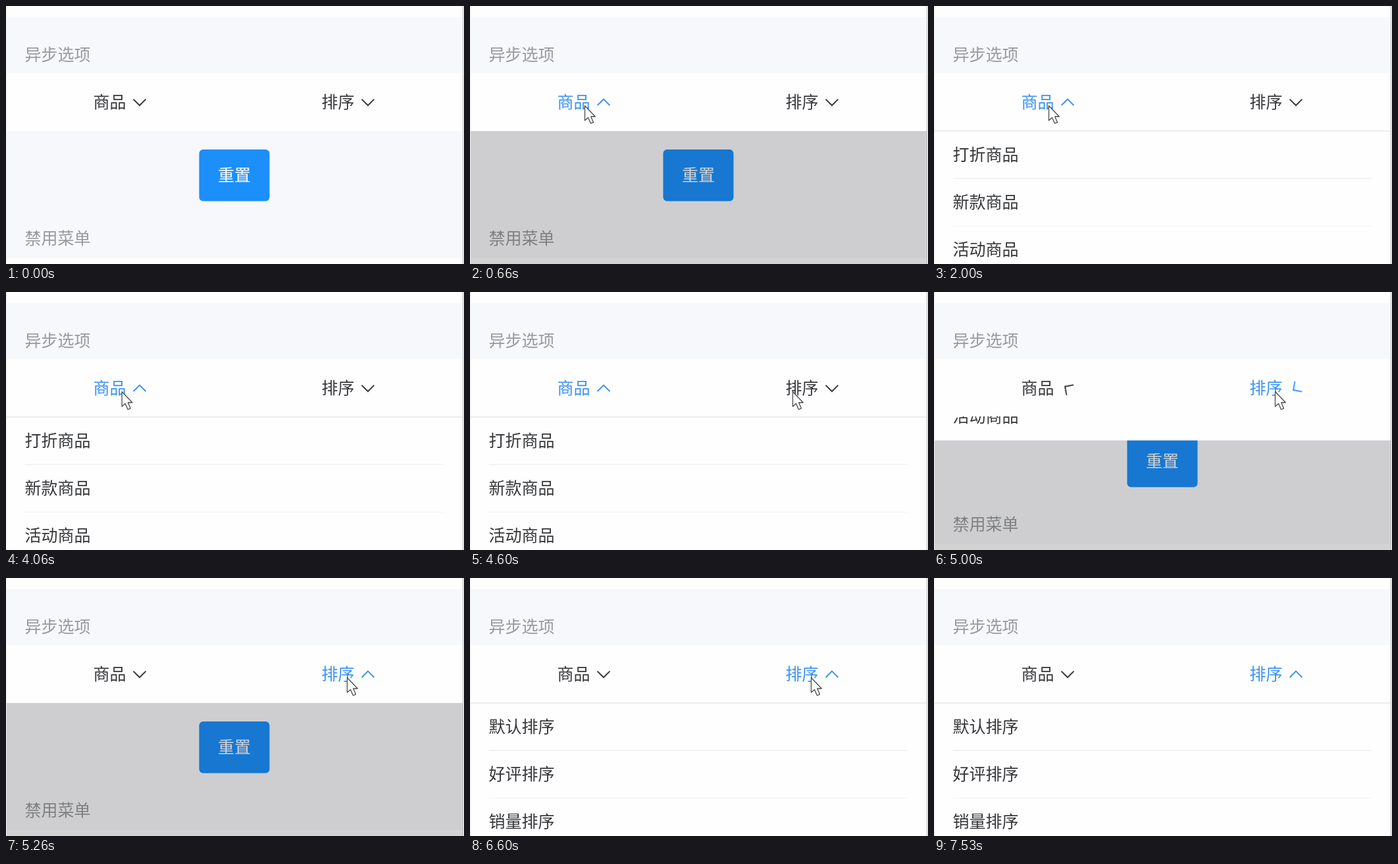
Animation, 696 px wide and 392 px high, one loop 8 s. Source, as an HTML page:

```html
<!DOCTYPE html>
<html lang="zh-CN">
<head>
<meta charset="utf-8">
<title>异步选项</title>
<style>
  html, body { margin: 0; width: 100%; height: 100%; overflow: hidden; background: #fefefe; }
  svg { display: block; width: 696px; height: 392px; }
  text { font: 25px "Noto Sans CJK SC", "Noto Sans CJK", "Noto Sans", sans-serif; fill: #36373a; }
  text, .menu path, #cursor { filter: blur(.5px); }
  .label { fill: #98999b; }
  .menu { color: #38393c; }
  .menu.on { color: #3b92f8; }
  .menu text { fill: currentColor; }
  .menu path { fill: none; stroke: currentColor; stroke-width: 2; }
</style>
</head>
<body>
<svg viewBox="0 0 696 392">
  <defs><clipPath id="below"><rect y="189" width="695" height="203"/></clipPath></defs>
  <rect width="696" height="392" fill="#fefefe"/>
  <rect y="17" width="694" height="85" fill="#f7f8fb"/>
  <rect y="190" width="694" height="193" fill="#f7f8fb"/>
  <text class="label" x="28.5" y="82.5">异步选项</text>
  <text class="label" x="28.5" y="362">禁用菜单</text>
  <rect x="293.5" y="218" width="107" height="78.5" rx="6" fill="#1c8ffb"/>
  <text x="322" y="266" style="fill:#fff">重置</text>
  <rect id="shade" y="190" width="694" height="202" opacity="0"/>
  <g clip-path="url(#below)"><g id="panel">
    <rect y="190" width="694" height="217" fill="#fefefe"/>
    <path d="M0 190H694" stroke="#e6e7e8" stroke-width="1.5"/>
    <path d="M29 262H665" stroke="#eeeff1" stroke-width="1.5"/>
    <path d="M29 334.5H665" stroke="#f4f4f6"/>
    <text class="item" x="28.5" y="235.3"></text>
    <text class="item" x="28.5" y="307.3"></text>
    <text class="item" x="28.5" y="379.3"></text>
  </g></g>
  <g class="menu"><text x="132.5" y="154.8">商品</text><path d="M193.5 141.6L203 151L212.5 141.6"/></g>
  <g class="menu"><text x="479.5" y="154.8">排序</text><path d="M540.5 141.6L550 151L559.5 141.6"/></g>
  <path d="M.5 0V392" stroke="#ebecee"/>
  <path d="M694.5 0V392" stroke="#b8b9bb"/>
  <path id="cursor" d="M.5 .5V23L5.5 18.5L9.5 27.5L13.5 25.8L9.7 17H16.3Z" fill="#fff" stroke="#4b4b50" stroke-width="1.3" stroke-linejoin="round"/>
</svg>
<script>
const LOOP = 8000, HEIGHT = 218;
const goods = ['打折商品', '新款商品', '活动商品'];
const sorts = ['默认排序', '好评排序', '销量排序'];
const $ = id => document.getElementById(id);
const menus = [...document.querySelectorAll('.menu')];
const items = [...document.querySelectorAll('.item')];

const part = (t, from, to) => Math.min(1, Math.max(0, (t - from) / (to - from)));
const sine = p => (1 - Math.cos(Math.PI * p)) / 2;

// CSS "ease": cubic-bezier(.25, .1, .25, 1)
function ease(x) {
  const bez = (a, b, s) => 3 * a * s * (1 - s) ** 2 + 3 * b * s * s * (1 - s) + s ** 3;
  let lo = 0, hi = 1;
  for (let i = 0; i < 20; i++) {
    const mid = (lo + hi) / 2;
    if (bez(.25, .25, mid) < x) lo = mid; else hi = mid;
  }
  return bez(.1, 1, hi);
}

function setMenu(menu, on, turn, x) {
  menu.classList.toggle('on', on);
  menu.lastElementChild.setAttribute('transform', `rotate(${180 * turn} ${x} 146.3)`);
}

function cursorX(t) {
  if (t < 4060) return 174;
  if (t < 7400) return 174 + 344 * sine(part(t, 4030, 4730));
  return 518 + 143 * part(t, 7370, 7500) ** 2;
}

function draw(t) {
  const first = t >= 500 && t < 4960, second = t >= 4960;
  const swap = ease(part(t, 4960, 5160));
  setMenu(menus[0], first, t < 4960 ? ease(part(t, 480, 660)) : 1 - swap, 203);
  setMenu(menus[1], second, swap, 550);

  $('shade').setAttribute('opacity', t < 500 ? 0 : .17 * ease(part(t, 470, 660)));

  const close = t < 4900 || t >= 6600 ? 0 : ease(part(t, 4868, 5118));
  const open = t >= 2000 && close < 1;
  $('panel').setAttribute('visibility', open ? 'visible' : 'hidden');
  $('panel').setAttribute('transform', `translate(0 ${-HEIGHT * close})`);
  const list = t < 6600 ? goods : sorts;
  items.forEach((el, i) => { if (el.textContent !== list[i]) el.textContent = list[i]; });

  $('cursor').setAttribute('visibility', t >= 500 && t < 7530 ? 'visible' : 'hidden');
  $('cursor').setAttribute('transform', `translate(${cursorX(t)} 151)`);
}

const start = performance.now();
function tick() {
  draw((performance.now() - start) % LOOP);
  requestAnimationFrame(tick);
}
tick();
</script>
</body>
</html>
```
